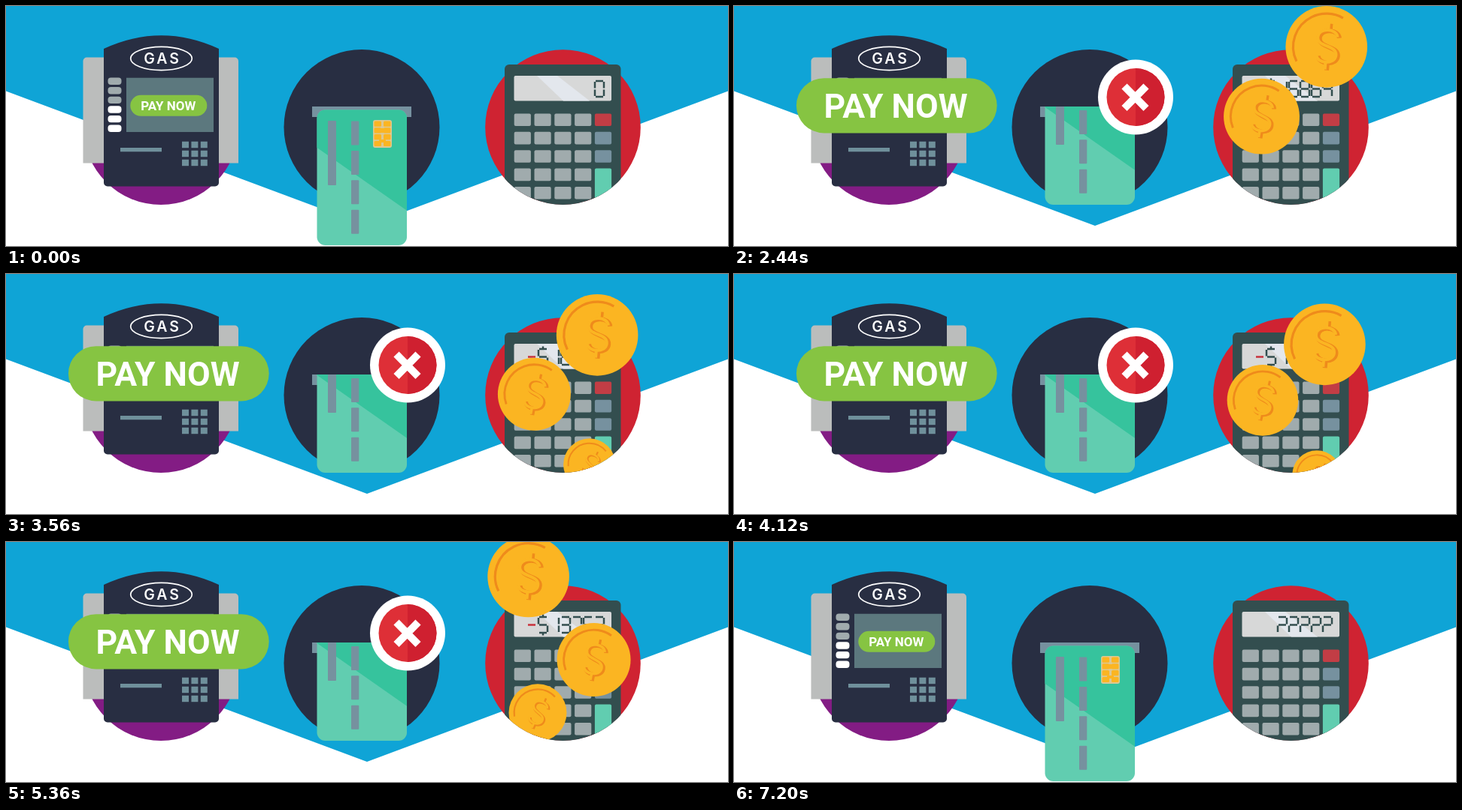
An HTML page with a canvas for the animation above (7.24 s loop, 960x320 px).

```html
<!DOCTYPE html>
<html lang="en">
<head>
<meta charset="utf-8">
<title>Pay now</title>
<style>
html, body { margin: 0; width: 100%; height: 100%; overflow: hidden; background: #fff; }
canvas { display: block; width: 960px; height: 320px; }
</style>
</head>
<body>
<canvas id="stage"></canvas>
<script>
const canvas = document.getElementById('stage');
const ctx = canvas.getContext('2d');
const dpr = window.devicePixelRatio || 1;
canvas.width = 960 * dpr;
canvas.height = 320 * dpr;

const LOOP = 7240;
const TAU = Math.PI * 2;
const NAVY = '#282e42', STEEL = '#76919f', SLATE = '#334e4f', KEY = '#a0abad';
const GOLD = '#fbb522', ORANGE = '#ef8b1b', MINT = '#61cdb0', GREEN = '#86c442';

const clamp = v => Math.max(0, Math.min(1, v));
const span = (t, a, b) => clamp((t - a) / (b - a));
const easeOut = p => 1 - (1 - p) ** 3;
const easeInOut = p => p * p * (3 - 2 * p);
const backOut = p => 1 + 2.1 * (p - 1) ** 3 + 1.1 * (p - 1) ** 2;

function box(x, y, w, h, color, r = 0) {
  ctx.fillStyle = color;
  ctx.beginPath();
  ctx.roundRect(x, y, w, h, r);
  ctx.fill();
}

function disc(x, y, r, color) {
  ctx.fillStyle = color;
  ctx.beginPath();
  ctx.arc(x, y, r, 0, TAU);
  ctx.fill();
}

function poly(color, ...pts) {
  ctx.fillStyle = color;
  ctx.beginPath();
  for (let i = 0; i < pts.length; i += 2) ctx.lineTo(pts[i], pts[i + 1]);
  ctx.fill();
}

function scoped(draw) {
  ctx.save();
  draw();
  ctx.restore();
}

function label(text, x, y, font, spacing = '0px') {
  ctx.font = font;
  ctx.letterSpacing = spacing;
  ctx.textAlign = 'center';
  ctx.textBaseline = 'alphabetic';
  ctx.fillStyle = '#fff';
  ctx.fillText(text, x, y);
  ctx.letterSpacing = '0px';
}

// Fuel pump terminal

function drawPump(grow) {
  disc(206, 162, 103, '#831c84');
  box(102.5, 68.5, 206.5, 141, '#bbbdbc', [5, 5, 0, 0]);

  ctx.fillStyle = NAVY;
  ctx.beginPath();
  ctx.moveTo(130, 57);
  ctx.quadraticCurveTo(206.5, 21.5, 283, 57);
  ctx.lineTo(283, 235);
  ctx.arcTo(283, 240.5, 278, 240.5, 5);
  ctx.lineTo(135, 240.5);
  ctx.arcTo(130, 240.5, 130, 235, 5);
  ctx.fill();

  ctx.strokeStyle = '#fff';
  ctx.lineWidth = 1.7;
  ctx.beginPath();
  ctx.ellipse(206.5, 70, 40.8, 15.6, 0, 0, TAU);
  ctx.stroke();
  label('GAS', 208, 77, '600 19.5px Inter, sans-serif', '3px');

  for (let i = 0; i < 6; i++) {
    box(135.5, 95.5 + i * 12.6, 18, 9.4, i < 3 ? KEY : '#fff', 4);
  }
  box(160, 95.7, 116, 72.3, '#5c787e');
  box(152, 189, 55, 5.3, '#6f909b');
  for (let i = 0; i < 9; i++) {
    box(234 + (i % 3) * 12.4, 180.7 + Math.floor(i / 3) * 12, 9, 8.5, '#6f909b');
  }

  scoped(() => {
    const s = 1 + 1.615 * grow;
    ctx.translate(216.3, 132.8);
    ctx.scale(s, s);
    box(-51, -14, 102, 28, GREEN, 14);
    label('PAY NOW', -0.5, 6.1, 'bold 17px Roboto, Arial, sans-serif');
  });
}

// Bank card and declined badge

function drawChip() {
  box(488, 152, 25, 37, '#dcc893', 3);
  for (let i = 0; i < 4; i++) {
    const y = 153.5 + i * 8.8;
    box(489.5, y, 9.5, 7.2, GOLD, 1.5);
    box(502, y, 9.5, 7.2, GOLD, 1.5);
  }
  box(496, 163, 9, 6, GOLD, 1);
  box(496, 178, 9, 4, GOLD, 1);
}

function drawCard(lift) {
  disc(473, 161.5, 103.5, NAVY);
  box(407, 134, 132, 14, STEEL);
  scoped(() => {
    ctx.beginPath();
    ctx.rect(400, 134, 150, 186);
    ctx.clip();
    ctx.translate(0, -54 * lift);
    ctx.beginPath();
    ctx.roundRect(413.5, 138.5, 119.5, 180.5, 11);
    ctx.clip();
    box(413, 138, 121, 182, MINT);
    poly('#36c39d', 413, 138, 534, 138, 534, 273.5, 413, 188.5);
    box(428, 153, 11, 86, STEEL, 1);
    for (let i = 0; i < 4; i++) box(459, 153.5 + i * 39.4, 10.3, 32, STEEL, 1);
    drawChip();
  });
}

function drawBadge(size) {
  if (size < 0.005) return;
  scoped(() => {
    ctx.translate(534, 121.5);
    ctx.scale(size, size);
    disc(0, 0, 50, '#fff');
    disc(0, 0, 38.5, '#de2f37');
    ctx.fillStyle = '#cf2030';
    ctx.beginPath();
    ctx.arc(0, 0, 38.5, -Math.PI / 2, Math.PI / 2);
    ctx.fill();
    ctx.strokeStyle = '#fff';
    ctx.lineWidth = 10;
    ctx.beginPath();
    ctx.moveTo(-15, -14.5);
    ctx.lineTo(14, 15);
    ctx.moveTo(14, -14.5);
    ctx.lineTo(-15, 15);
    ctx.stroke();
  });
}

// Calculator

// Seven segments a-g: top, right pair, bottom, left pair, middle
const SEGMENTS = {
  a: [1, 0, 11, 0], b: [12, 1, 12, 9.5], c: [12, 11.5, 12, 20],
  d: [1, 21, 11, 21], e: [0, 11.5, 0, 20], f: [0, 1, 0, 9.5], g: [1, 10.5, 11, 10.5]
};
const GLYPHS = {
  0: 'abcdef', 1: 'bc', 2: 'abged', 3: 'abgcd', 4: 'fgbc', 5: 'afgcd',
  6: 'afgecd', 7: 'abc', 8: 'abcdefg', 9: 'abcdfg', '?': 'abge', '$': 'afgcd', '-': 'g'
};

function drawGlyph(ch, x) {
  ctx.strokeStyle = ch === '-' ? '#c8323c' : SLATE;
  ctx.lineWidth = 2.5;
  ctx.beginPath();
  for (const key of GLYPHS[ch]) {
    const [x1, y1, x2, y2] = SEGMENTS[key];
    ctx.moveTo(x + x1, 100 + y1);
    ctx.lineTo(x + x2, 100 + y2);
  }
  if (ch === '$') {
    ctx.moveTo(x + 6, 96.5);
    ctx.lineTo(x + 6, 101);
    ctx.moveTo(x + 6, 120);
    ctx.lineTo(x + 6, 124.5);
  }
  ctx.stroke();
}

function readout(t) {
  if (t < 2160) return '0';
  if (t >= 6600) return '?????';
  const tick = Math.floor(t / 40) * 40;
  const n = Math.floor(6864 + 382002 * (tick - 2440) / 3520);
  return '-$' + (10000 + ((n % 10000) + 10000) % 10000);
}

function clipPocket() {
  ctx.beginPath();
  ctx.rect(600, 0, 290, 161.5);
  ctx.arc(740.5, 161.5, 103.5, 0, Math.PI);
  ctx.clip();
}

function drawCalculator(t) {
  disc(740.5, 161.5, 103.3, '#cf2332');
  scoped(() => {
    clipPocket();
    box(663, 78, 154.5, 200, SLATE, 6);
    box(675.5, 93, 129.5, 33.5, '#d7d8d8', 2);
    poly('#e3e7ed', 706, 93, 733, 93, 776, 126.5, 741, 126.5);
    const text = readout(t);
    [...text].forEach((ch, i) => drawGlyph(ch, 783 - (text.length - 1 - i) * 15));

    for (let row = 0; row < 5; row++) {
      for (let col = 0; col < 5; col++) {
        if (col === 4 && row > 2) continue;
        const color = col < 4 ? KEY : row ? STEEL : '#c23d45';
        box(675.7 + col * 26.8, 143.4 + row * 24.4, 22.2, 16.6, color, 2);
      }
    }
    box(782.9, 216.6, 22.2, 41, MINT, 2);
  });
}

// Coins: height as a function of age in ms
const FALL = [[-70, -56], [-30, 14], [0, 54], [66, 81], [172, 121], [235, 147],
  [301, 160], [358, 174], [407, 187], [593, 253.5], [715, 305]];

function fallY(age) {
  const i = FALL.findIndex(p => p[0] > age);
  const [t0, y0] = FALL[i - 1], [t1, y1] = FALL[i];
  return y0 + (y1 - y0) * (age - t0) / (t1 - t0);
}

function dollar(color, width) {
  ctx.strokeStyle = color;
  ctx.lineWidth = width;
  ctx.beginPath();
  ctx.moveTo(13, -13);
  ctx.bezierCurveTo(11, -25, -13, -24, -13, -11);
  ctx.bezierCurveTo(-13, 3, 13, -3, 13, 11);
  ctx.bezierCurveTo(13, 24, -11, 25, -13, 13);
  ctx.moveTo(0, -31);
  ctx.lineTo(0, -21);
  ctx.moveTo(0, 21);
  ctx.lineTo(0, 31);
  ctx.stroke();
}

function drawCoin(age, right) {
  if (age < -70 || age >= 715) return;
  const y = fallY(age);
  const drop = Math.max(0, y - 121);
  const x = right ? 791 - 0.06 * y : 691.5 + 0.068 * y;
  const s = (54.3 - 0.148 * drop) / 54;
  scoped(() => {
    ctx.translate(x, y);
    ctx.scale(s, s);
    disc(0, 0, 54, GOLD);
    ctx.rotate((5 + drop * 0.16) * Math.PI / 180);
    ctx.strokeStyle = ORANGE;
    ctx.lineWidth = 3.2;
    ctx.beginPath();
    ctx.arc(0, 0, 44, 2.6, 5.15);
    ctx.stroke();
    ctx.translate(3, 0);
    dollar(ORANGE, 6);
    ctx.translate(-2.5, -1);
    dollar(GOLD, 4);
  });
}

function drawCoins(t) {
  scoped(() => {
    clipPocket();
    for (let i = 0; i < 8; i++) {
      drawCoin(t - 2205 - i * 527, false);
      if (i < 7) drawCoin(t - 2440 - i * 527, true);
    }
  });
}

function draw(t) {
  ctx.setTransform(dpr, 0, 0, dpr, 0, 0);
  box(0, 0, 960, 320, '#fff');
  poly('#0fa4d6', 0, 0, 960, 0, 960, 113.5, 480, 293, 0, 113.5);

  const stay = 1 - easeInOut(span(t, 7000, 7200));
  drawPump(backOut(span(t, 1000, 1360)) * stay);
  drawCard(easeInOut(span(t, 1520, 1840)) * stay);
  drawBadge(easeOut(span(t, 1720, 2000)) * stay);
  drawCalculator(t);
  drawCoins(t);
}

function frame() {
  draw(performance.now() % LOOP);
  requestAnimationFrame(frame);
}
frame();
</script>
</body>
</html>
```
